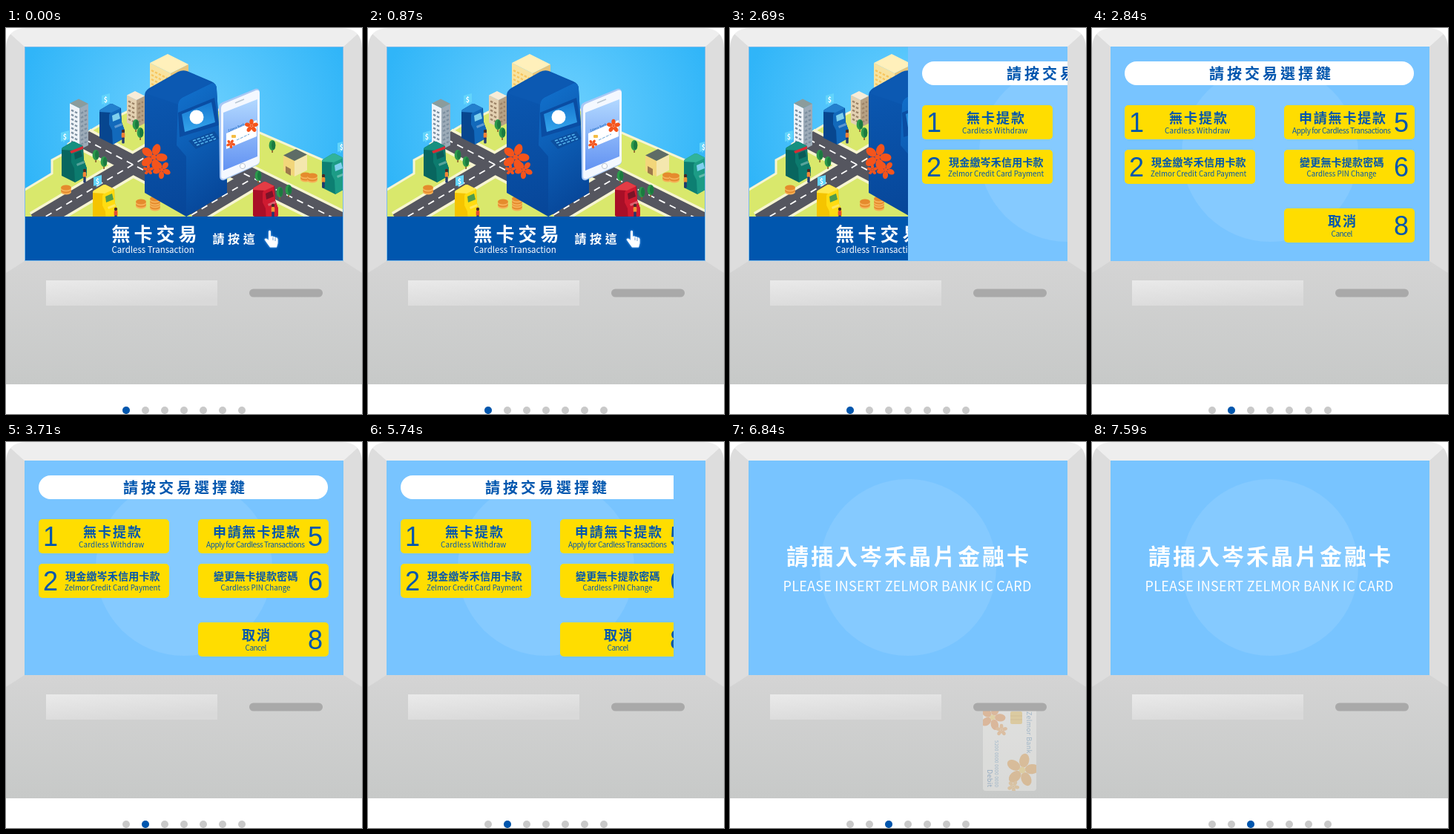
An HTML page that plays this animation: 480x520 px, repeating every 8 s.

```html
<!DOCTYPE html>
<html lang="zh-Hant">
<head>
<meta charset="utf-8">
<title>Cardless Transaction</title>
<style>
html, body { margin: 0; width: 100%; height: 100%; overflow: hidden; background: #fff; }
svg { display: block; width: 480px; height: 520px; }
text { font-family: "Noto Sans CJK TC", "Noto Sans CJK JP", "Noto Sans CJK SC", sans-serif; white-space: pre; }
.num { font-family: "Liberation Sans", Arial, sans-serif; }
</style>
</head>
<body>
<svg id="stage" viewBox="0 0 480 520" xmlns="http://www.w3.org/2000/svg"></svg>
<script>
const BLUE = '#0056ae', YELLOW = '#ffdd00', SKY = '#78c4ff', ORANGE = '#f4541c', CREAM = '#f7f5d2';

// Shape helpers
const poly = (pts, fill, more = '') => `<polygon points="${pts}" fill="${fill}" ${more}/>`;
const path = (d, fill, more = '') => `<path d="${d}" fill="${fill}" ${more}/>`;
const rect = (x, y, w, h, fill, r = 0, more = '') => `<rect x="${x}" y="${y}" width="${w}" height="${h}" rx="${r}" fill="${fill}" ${more}/>`;
const disc = (x, y, r, fill, more = '') => `<circle cx="${x}" cy="${y}" r="${r}" fill="${fill}" ${more}/>`;
const oval = (x, y, rx, ry, fill) => `<ellipse cx="${x}" cy="${y}" rx="${rx}" ry="${ry}" fill="${fill}"/>`;
const text = (s, x, y, size, fill, gap = 0, weight = 400, more = '') =>
  `<text x="${x}" y="${y}" font-size="${size}" fill="${fill}" letter-spacing="${gap}" font-weight="${weight}" ${more}>${s}</text>`;
const grad = (id, x2, y2, a, b) =>
  `<linearGradient id="${id}" x2="${x2}" y2="${y2}"><stop stop-color="${a}"/><stop offset="1" stop-color="${b}"/></linearGradient>`;

// Isometric box: bottom corner (x, y), left and right widths, height
function box(x, y, l, r, h, [left, right, top]) {
  const a = l * .5, b = r * .5;
  return poly(`${x},${y} ${x - l},${y - a} ${x - l},${y - a - h} ${x},${y - h}`, left) +
    poly(`${x},${y} ${x + r},${y - b} ${x + r},${y - b - h} ${x},${y - h}`, right) +
    poly(`${x},${y - h} ${x - l},${y - a - h} ${x + r - l},${y - a - b - h} ${x + r},${y - b - h}`, top);
}

function tower(x, y, l, r, h, colors, pane) {
  let s = box(x, y, l, r, h, colors);
  for (let v = 6; v < h - 4; v += 6) {
    s += path(`M${x - l + 2} ${y - l * .5 - v + 1}L${x - 2} ${y - v - 1}M${x + 2} ${y - v - 1}L${x + r - 2} ${y - r * .5 - v + 1}`,
      'none', `stroke="${pane}" stroke-width="2.4" stroke-dasharray="3.5 2"`);
  }
  return s;
}

const roads = d => [[CREAM, 32, ''], ['#55565f', 25, ''], ['#fff', 1.8, '9 7']]
  .map(([c, w, dash]) => path(d, 'none', `stroke="${c}" stroke-width="${w}" stroke-dasharray="${dash}"`)).join('');

function kiosk(x, y, [side, front, top], screen = '#7fd0ee') {
  return `<g transform="translate(${x} ${y})">` +
    path('M0 11Q0 8 3 7L13 1Q16 -1 19 1L29 6L30 25L34 36V46L18 55L0 46Z', side) +
    path('M13 16Q13 12 17 11L28 6L30 25L34 36V46L18 55L17 36L13 28Z', front) +
    path('M0 11Q0 8 3 7L13 1Q16 -1 19 1L29 6L16 12Z', top) +
    poly('17,16 26,12 28,20 18,24', screen) + poly('20,30 30,26 31,29 21,33', '#ffffff50') + '</g>';
}

const tree = (x, y) => rect(x - .7, y, 1.6, 10, '#8a5a2b') + oval(x, y, 4.4, 7, '#2c9a4b') + oval(x + 1.6, y, 2.6, 6, '#1b7a40');
const person = (x, y, shirt) => disc(x, y, 2.2, '#4a2b26') + rect(x - 2.3, y + 2, 4.6, 7, shirt, 1.5) + rect(x - 1.7, y + 8.5, 3.4, 8, '#22386e', 1);
const coins = (x, y) => [4, 2, 0, -2].map(d => oval(x, y + d, 7, 3.5, d % 4 ? '#e58b2d' : '#f6b158')).join('');
const sign = (x, y) => path(`M${x - 5} ${y - 5}L${x + 6} ${y - 8}V${y + 4}L${x} ${y + 6}L${x - 1} ${y + 9}L${x - 2} ${y + 6}L${x - 5} ${y + 7}Z`, '#62d4fb') +
  text('$', x - 2.2, y + 3.5, 9, '#fff', 0, 700);

function flower(x, y, r, fill, turn = 0, heart = fill) {
  let s = '';
  for (let i = 0; i < 5; i++)
    s += `<ellipse cy="${-r * .6}" rx="${r * .3}" ry="${r * .43}" fill="${fill}" transform="rotate(${turn + i * 72})"/>`;
  return `<g transform="translate(${x} ${y})">${s}${disc(0, 0, r * .2, heart)}</g>`;
}

function city() {
  return rect(25, 25, 430, 230, 'url(#sky)') +
    poly('22,220 62,196 62,178 84,166 84,156 128,130 165,112 245,86 330,136 460,192 460,260 22,260', '#d9e86c',
      `stroke="${CREAM}" stroke-width="3"`) +
    roads('M40 262L262 130M106 150L250 225M250 252L330 204M292 182L462 266') +
    tower(222, 94, 28, 24, 33, ['#f8e3a0', '#e6c57c', '#fff0bb'], '#f8c65f') +
    tower(176, 134, 13, 11, 37, ['#e3d1b2', '#b7a184', '#f7ecd8'], '#9d8468') +
    tower(99, 164, 13, 12, 56, ['#eef3f8', '#9cabb8', '#8b9c9c'], '#7c8e9f') +
    kiosk(126, 102, ['#07468f', '#1269bb', '#2380ce']) + person(158, 139, '#ef8036') +
    kiosk(75, 153, ['#08665f', '#0c7b6e', '#169080'], '#0a5c58') + poly('86,166 104,159 104,163 88,169', '#d92c35') +
    person(106, 192, '#f58634') +
    kiosk(117, 211, ['#f5c400', '#ffdc11', '#ffe84e'], '#4f9a4c') + person(148, 244, '#e24e35') +
    box(389, 200, 15, 17, 21, ['#f2d67a', '#f4e7ae', '#5e6c66']) + poly('377,186 384,190 384,199 377,195', '#9e794b') +
    kiosk(426, 169, ['#0d7f72', '#1c9c86', '#31b39a']) + person(428, 199, '#f09136') +
    kiosk(333, 207, ['#a90f27', '#cf1a30', '#e43c45'], '#7a1428') + person(360, 239, '#ee9336') +
    [[121, 171], [132, 180], [175, 130], [181, 141], [359, 158], [340, 199], [369, 221], [381, 218]].map(p => tree(...p)).join('') +
    [[182, 236], [201, 239], [201, 232], [81, 217], [404, 200], [413, 201]].map(p => coins(...p)).join('') +
    [[134, 96], [79, 146], [123, 206], [452, 160]].map(p => sign(...p)).join('') + machine() + phone();
}

function machine() {
  return path('M187 91Q187 85 193 81L232 59Q238 56 244 58L277 72Q284 75 284 82L288 148L298 184V222L243 254L187 222Z', 'url(#side)') +
    path('M232 103Q232 96 239 93L278 74Q284 75 284 82L288 148L298 184V222L243 254V173L230 158Z', 'url(#front)') +
    path('M188 88L232 61Q238 57 244 59L278 74L239 93Q233 96 232 103Z', '#0c59b2') +
    poly('232,114 281,94 287,131 234,147', '#0a4da3') + poly('237,116 277,100 282,127 241,140', 'url(#screenGlow)') +
    disc(257, 120, 9.5, '#fff') +
    poly('246,152 281,139 288,149 256,163', '#0c4f9f') +
    path('M252 152L279 143M254 155L281 146M257 158L283 149', 'none', 'stroke="#55b5ee" stroke-width="1.6" stroke-dasharray="4 2"') +
    flower(199, 174, 18, ORANGE, 20) + flower(210, 191, 12, ORANGE, 40) + flower(192, 191, 7, ORANGE);
}

function phone() {
  return path('M287 107Q287 102 292 100L336 82Q342 81 342 87V179Q342 183 338 185L294 205Q288 206 288 200Z', '#a9c8f5') +
    path('M290 108Q290 104 294 102L337 84Q342 83 342 88V178Q342 182 338 184L295 203Q290 204 290 200Z', '#f4f8ff') +
    poly('293,114 339,96 339,173 293,192', 'url(#glass)') +
    path('M309 101L321 96', 'none', 'stroke="#b8c6d3" stroke-width="1.5"') +
    disc(319, 186, 3.6, '#fff', 'stroke="#b8c4d0"') +
    poly('297,142 338,124 338,146 297,163', '#fff') + rect(304, 144, 6, 4, '#f4bd44', 1) +
    flower(331, 132, 9, ORANGE) + flower(303, 156, 6, ORANGE, 30) +
    path('M311 151L328 143', 'none', 'stroke="#6aa6d8" stroke-width="1" stroke-dasharray="4 1.5"') +
    text('Zelmor Bank', 300, 140, 4, BLUE, 0, 400, 'transform="rotate(-23 300 140)"');
}

const hand = `<g style="filter:drop-shadow(0 0 1.5px #6fb8ff)">` +
  path('M354 274Q355.500 271.500 357 274V281Q359 279.500 360 281.500Q362 280 363 282.500Q366 281.500 366.500 284.500V290L365 295.500H356L352 290L348.500 285Q349 282.500 352 284L354 286Z', '#fff') +
  path('M360 282V286M363 283V287', 'none', `stroke="${BLUE}" stroke-width=".6"`) + '</g>';

function welcome() {
  return city() + rect(25, 254, 430, 60, BLUE) +
    text('無卡交易', 142.5, 286.5, 25, '#fff', 5, 700) +
    text('Cardless Transaction', 142.5, 303, 11.5, '#fff') +
    text('請按這', 278.5, 290.3, 16, '#fff', 4.6, 700) + hand +
    rect(25.5, 25.5, 429, 288, 'none', 0, 'stroke="#7dbbea"');
}

const panel = rect(25, 25, 430, 289, SKY) + disc(240, 169, 119, '#85caff');

// x, y, digit, digit x, Chinese [text, x, size, gap], English [text, x, size, gap]
const KEYS = [
  [44, 104, 1, 50, ['無卡提款', 104, 18, 2], ['Cardless Withdraw', 98, 10, .1]],
  [44, 164, 2, 50, ['現金繳岑禾信用卡款', 80, 14, .2], ['Zelmor Credit Card Payment', 79, 9.8, 0]],
  [259, 104, 5, 407, ['申請無卡提款', 279, 18, 1.8], ['Apply for Cardless Transactions', 270, 10, -.42]],
  [259, 164, 6, 407, ['變更無卡提款密碼', 280, 14, .2], ['Cardless PIN Change', 289.5, 9.8, 0]],
  [259, 243, 8, 407, ['取消', 318, 18, 2], ['Cancel', 322.5, 10, -.5]]
];

function menu() {
  return panel + rect(44, 45, 390, 32, '#fff', 16) + text('請按交易選擇鍵', 158, 68.5, 20, BLUE, 4, 700) +
    KEYS.map(([x, y, n, nx, [zh, zx, zs, zg], [en, ex, es, eg]]) =>
      rect(x, y, 176, 46, YELLOW, 5) +
      text(n, nx, y + 36, 36, BLUE, 0, 400, 'class="num"') +
      text(zh, zx, y + (zs > 15 ? 24.3 : 22), zs, BLUE, zg, 700) +
      text(en, ex, y + (zs > 15 ? 38 : 36), es, BLUE, eg)).join('');
}

function prompt() {
  return panel + text('請插入岑禾晶片金融卡', 76, 164.5, 30, '#fff', 3, 700) +
    text('PLEASE INSERT ZELMOR BANK IC CARD', 71.5, 201, 18, '#fff', .25);
}

function card() {
  const down = (s, x, y, size, fill) => text(s, x, y, size, fill, .3, 500, `transform="rotate(90 ${x} ${y})"`);
  return rect(341, 357, 72, 113, '#fbfaf6', 4) +
    `<g clip-path="url(#cardEdge)">` +
    flower(354, 371, 17, '#f08a3c', 20, '#ffd25a') + flower(366, 388, 8, '#f3a04f') +
    flower(394, 442, 22, '#f0a040', 12, '#ffd25a') + flower(382, 464, 8, '#f6b45c', 30) + '</g>' +
    rect(378, 363, 16, 17, '#f2c04a', 2) + path('M378 369H394M378 374H394', 'none', 'stroke="#c9922a" stroke-width=".7"') +
    down('Zelmor Bank', 400, 363, 9, '#4a86bb') + down('5200 0000 0000 0000', 357, 402, 6, '#3f83c0') +
    down('Debit', 347, 441, 9, '#2d6dad');
}

const dots = [...Array(7)].map((_, i) => disc(162 + i * 26, 515, 5, '#c9c9c9')).join('');

stage.innerHTML = `<defs>
  <radialGradient id="sky" gradientUnits="userSpaceOnUse" cx="245" cy="130" r="230">
    <stop stop-color="#74d3ff"/><stop offset="1" stop-color="#30b5f8"/></radialGradient>
  ${grad('side', .2, 1, '#0b5ab4', '#07479a')}${grad('front', .3, 1, '#1273cf', '#07489b')}
  ${grad('screenGlow', 0, 1, '#1577d0', '#35a5ec')}
  ${grad('glass', 0, 1, '#b2d8ff', '#6292f2')}${grad('base', 0, 1, '#d4d4d4', '#c7c9c8')}
  ${grad('tray', .5, 1, '#eaeaea', '#d9d9d9')}
  <clipPath id="screen"><rect x="25" y="25" width="430" height="289"/></clipPath>
  <clipPath id="mouth"><rect x="328" y="357" width="100" height="123"/></clipPath>
  <clipPath id="cardEdge"><rect x="341" y="357" width="72" height="113" rx="4"/></clipPath>
  <clipPath id="shell"><path d="M0 480V28Q0 0 28 0H452Q480 0 480 28V480Z"/></clipPath></defs>
  <g clip-path="url(#shell)">${rect(0, 314, 480, 166, 'url(#base)')}
  ${poly('0,0 480,0 480,2.5 455,25 25,25 0,2.5', '#eeeeee')}
  ${poly('0,2.5 25,25 25,314 0,330', '#dddddd')}${poly('480,2.5 455,25 455,314 480,330', '#dddddd')}
  ${rect(54, 340, 231, 34, 'url(#tray)')}</g>
  <g clip-path="url(#screen)"><g>${welcome()}</g><g id="menu">${menu()}</g><g id="prompt">${prompt()}</g>
  <circle id="ripple" fill="#fff"/></g>
  <g clip-path="url(#mouth)"><g id="card">${card()}</g></g>
  ${rect(328, 351.5, 99, 11, '#a9a9a9', 5.5)}${dots}
  ${disc(162, 515, 5, BLUE, 'id="active"')}`;

const LOOP = 8000, STEP = 30;
const el = id => document.getElementById(id);
const set = (id, attrs) => { for (const k in attrs) el(id).setAttribute(k, attrs[k]); };
const clamp = v => Math.min(1, Math.max(0, v));
const steps = (t, start) => Math.floor((t - start) / STEP) + 1;
const TAPS = [[360, 250, 284], [3200, 348, 126.5]];

function draw(t) {
  const toMenu = clamp(steps(t, 2570) / 10), toPrompt = clamp(steps(t, 5740) / 10);
  set('menu', { transform: `translate(${430 * (1 - toMenu)} 0)` });
  set('prompt', { transform: `translate(${430 * (1 - toPrompt)} 0)` });
  set('active', { cx: 162 + 26 * ((toMenu === 1) + (toPrompt === 1)) });

  const tap = TAPS.find(([s]) => t >= s && t < s + 510);
  const p = tap ? steps(t, tap[0]) / 18 : 1;
  set('ripple', { cx: tap ? tap[1] : 0, cy: tap ? tap[2] : 0, r: 27 * (1 - (1 - p) ** 2), opacity: .65 * (1 - p) });

  // The card fades in below the slot, then slides up into it
  const n = steps(t, 6840), rise = clamp((n - 6) / 20);
  set('card', {
    opacity: n < 1 || n > 25 ? 0 : clamp(.35 + (n - 1) * .16),
    transform: `translate(0 ${-114 * rise * rise * (3 - 2 * rise)})`
  });
}

function tick() {
  draw(performance.now() % LOOP);
  requestAnimationFrame(tick);
}
tick();
</script>
</body>
</html>
```
